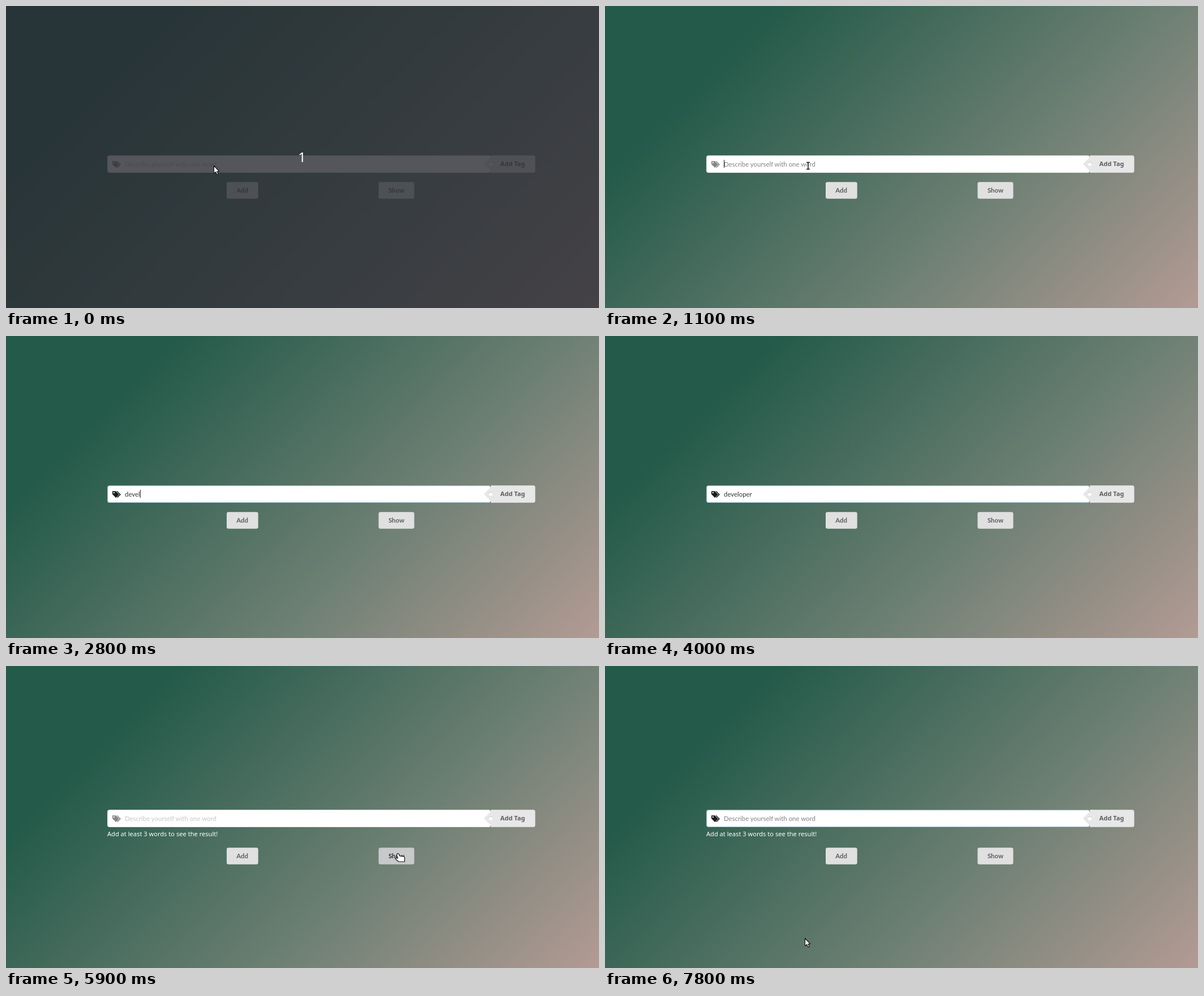
An HTML page that plays this animation: 1048 by 534 pixels, repeating every 8 s.

```html
<!DOCTYPE html>
<html lang="en">
<head>
<meta charset="utf-8">
<title>Tag input</title>
<style>
  html, body { margin: 0; width: 100%; height: 100%; overflow: hidden; }
  svg {
    display: block; width: 100%; height: 100%;
    background: linear-gradient(135deg, #235a49 19%, #6e8074 64%, #b39b94);
  }
  text { font: 11.4px Lato, sans-serif; white-space: pre; }
  .bold { font-weight: 700; fill: #5d5d5d; }
  .ubuntu { font: 11.1px "Noto Sans", "Open Sans", sans-serif; }
  .bold.ubuntu { font-weight: 700; }
  .button text { text-anchor: middle; }
  .button rect { fill: #dfe0df; }
  .button.hover rect { fill: #c8c9ca; }
  .button.hover text { fill: #303030; }
</style>
</head>
<body>
<svg viewBox="0 0 1048 534">
  <g id="field">
    <rect id="box" x="179.5" y="264.7" width="677" height="29.8" rx="3" fill="#fff"/>
    <g id="icon" fill="#1b1b1b">
      <path fill-rule="evenodd" d="M188 274.2h6l6 6-5.8 5.8-6.200-6.200zM192 277a1.200 1.200 0 1 0-2.400 0a1.200 1.200 0 1 0 2.400 0"/>
      <path d="M195.200 274.200h1.800l6 6-5.800 5.800-1.200-1 4.800-4.800z"/>
    </g>
    <text id="value" x="210" y="283.6"></text>
    <rect id="caret" y="272" width="1" height="14" fill="#222"/>
    <g fill="#e7e7e7">
      <rect x="857" y="264.3" width="78.300" height="30.500" rx="3.500"/>
      <path d="M857 264.300h4v30.500h-4zM844.500 279.500l12.500-12.500v25z"/>
    </g>
    <circle cx="856.700" cy="279.300" r="3.500" fill="#fff"/>
    <path d="M853.400 278.700a3.400 3.400 0 0 1 6.600 0" fill="none" stroke="#bbb" stroke-width=".8"/>
    <text class="bold ubuntu" x="873.500" y="283">Add Tag</text>
  </g>
  <text id="error" class="ubuntu" x="179" y="300.500" fill="#fff">Add at least 3 words to see the result!</text>
  <g id="buttons">
    <g class="button">
      <rect x="390" y="311.300" width="55.700" height="29.500" rx="3.300"/>
      <text class="bold" x="417.500" y="330">Add</text>
    </g>
    <g class="button" id="show">
      <rect x="658.500" y="311.300" width="63" height="29.500" rx="3.300"/>
      <text class="bold" x="690" y="330">Show</text>
    </g>
  </g>
  <g id="countdown">
    <rect width="1048" height="534" fill="#2a2c34" fill-opacity=".8"/>
    <text class="ubuntu" x="523" y="276" fill="#fff" text-anchor="middle" style="font-size:24px">1</text>
  </g>
  <g id="cursor" stroke="#111" stroke-linejoin="round">
    <path id="arrow" d="M.5.500V14l3.100-2.700 2.400 5 2.200-1-2.300-4.800h4z" fill="#fff" stroke-width="1.100"/>
    <g id="beam" fill="none">
      <path d="M-3-5.500H3M-3 6.500H3M0-5.500V6.500" stroke="#fff" stroke-width="3.400"/>
      <path d="M-3-5.500H3M-3 6.500H3M0-5.500V6.500" stroke-width="1.500"/>
    </g>
    <path id="hand" d="M-3 1.500q1.500-1.500 3 0L2 5l7 .800q1.500.400 1.500 2V15H0L-5.500 10.500q-.6-2 1.400-2L-1.500 9-3.500 3.500z" fill="#fff" stroke-width="1.200"/>
  </g>
</svg>
<script>
const LOOP = 8000, STEP = 100;
const FOCUS = 1100, TYPE = 2200, PER_LETTER = 150, SUBMIT = 4400, BLUR = 5700, ERROR = 5900, REFOCUS = 7200;
const WORD = 'developer', PLACEHOLDER = 'Describe yourself with one word';
const TYPED = TYPE + (WORD.length - 1) * PER_LETTER;

// Each pointer move eases to its goal, rests there and disappears at `hide`.
const moves = [
  { start: 0, end: 1100, hide: 1200, from: [367, 282], to: [359, 282] },
  { start: 1200, end: 1600, hide: 1700, from: [359, 282], to: [906, 512] },
  { start: 5000, end: 5600, hide: 6000, from: [906, 502], to: [694, 331] },
  { start: 6000, end: 6100, hide: 6200, from: [664, 355], to: [664, 355] },
  { start: 6400, end: 6900, hide: 7100, from: [454, 457], to: [364, 290] },
  { start: 7100, end: 7600, hide: LOOP, from: [366, 272], to: [353, 481] },
];

const $ = id => document.getElementById(id);
const show = (id, on) => $(id).setAttribute('visibility', on ? 'visible' : 'hidden');
const shiftY = (id, y) => $(id).setAttribute('transform', `translate(0 ${y})`);
const easeOut = k => 1 - (1 - k) ** 2;

function pointerAt(t) {
  const move = moves.find(m => t >= m.start && t < m.hide);
  if (!move) return null;
  const k = easeOut(Math.min((t - move.start) / (move.end - move.start), 1));
  return move.from.map((v, i) => Math.round(v + (move.to[i] - v) * k));
}

function pointerKind([x, y], shift) {
  if (x > 179 && x < 857 && Math.abs(y - 279.5 + shift) < 15) return 'beam';
  if (Math.abs(x - 690) < 31.5 && Math.abs(y - 326 - shift) < 15) return 'hand';
  return 'arrow';
}

function drawPointer(t, shift) {
  const pos = pointerAt(t);
  const kind = pos && (t < STEP ? 'arrow' : pointerKind(pos, shift));
  for (const id of ['arrow', 'beam', 'hand']) show(id, kind === id);
  if (pos) $('cursor').setAttribute('transform', `translate(${pos})`);
  $('show').classList.toggle('hover', kind === 'hand');
}

function drawField(t) {
  const focusedAt = t >= REFOCUS ? REFOCUS : t >= FOCUS && t < BLUR ? FOCUS : Infinity;
  const focused = t >= focusedAt;
  const fade = focused ? Math.min((t - focusedAt) / 200, 1) : 0;
  $('icon').setAttribute('opacity', 0.52 + 0.48 * fade);
  $('box').setAttribute('stroke', fade ? '#8db4c4' : '#e4e6e4');

  const letters = t >= TYPE && t < SUBMIT ? 1 + Math.floor((t - TYPE) / PER_LETTER) : 0;
  const value = $('value');
  value.textContent = WORD.slice(0, letters) || PLACEHOLDER;
  value.setAttribute('fill', letters ? '#333' : focused ? '#828282' : '#c7c7c7');

  // The blink restarts with every action in the field.
  const lastAction = [REFOCUS, SUBMIT, Math.min(t, TYPED), FOCUS]
    .find((at, i) => t >= at && (i !== 2 || letters));
  show('caret', focused && (t - lastAction) % 1100 < 600);
  $('caret').setAttribute('x', 210 + Math.round(letters ? value.getComputedTextLength() : 0));
}

function draw(t) {
  const shift = t >= ERROR ? 10 : 0;
  shiftY('field', -shift);
  shiftY('buttons', shift);
  show('error', shift);
  show('countdown', t < STEP);
  drawField(t);
  drawPointer(t, shift);
}

function frame(now) {
  draw(Math.floor(now % LOOP / STEP) * STEP);
  requestAnimationFrame(frame);
}
draw(0);
requestAnimationFrame(frame);
</script>
</body>
</html>
```
